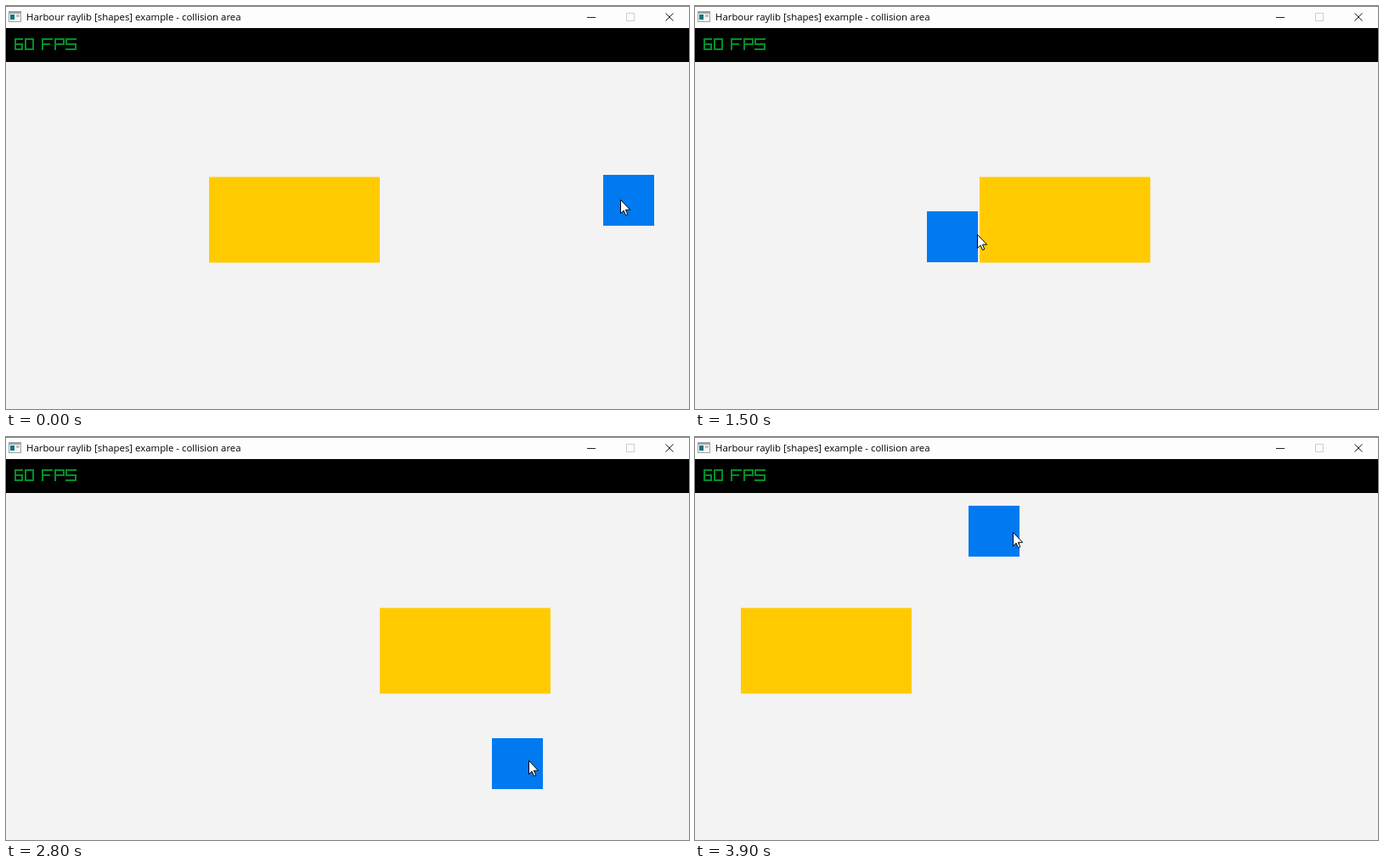
An HTML page for the animation above (4 s loop, 804 by 475 pixels).

```html
<!DOCTYPE html>
<html lang="en">
<head>
<meta charset="utf-8">
<title>Collision area</title>
<style>
  html, body { margin: 0; width: 100%; height: 100%; overflow: hidden; background: #f3f3f3; }
  svg { display: block; }
  .title { font: 11.4px "Open Sans", "Noto Sans", sans-serif; fill: #000; }
  .line { fill: none; stroke: #222; }
  .pale { fill: none; stroke: #cfcfcf; }
  .fps { fill: none; stroke: #00902b; stroke-width: 2; }
</style>
</head>
<body>
<svg width="804" height="475" viewBox="0 0 804 475">
  <!-- title bar -->
  <rect width="804" height="26" fill="#fdfdfd"/>
  <rect width="804" height="1" fill="#86817f"/>
  <g shape-rendering="crispEdges">
    <rect x="3" y="6" width="15" height="13" fill="#9aa3a8"/>
    <rect x="4" y="9" width="13" height="9" fill="#f4f6f7"/>
    <rect x="5" y="10" width="5" height="6" fill="#13747c"/>
    <rect x="12" y="10" width="4" height="3" fill="#b9c3c8"/>
    <path class="line" d="M684 13.5h10"/>
    <rect class="pale" x="730.5" y="8.5" width="9" height="9"/>
  </g>
  <path class="line" d="M776.5 8.5l9 9m0-9l-9 9"/>
  <text class="title" x="24" y="17">Harbour raylib [shapes] example - collision area</text>

  <!-- status bar -->
  <rect y="26" width="804" height="40"/>
  <path class="fps" d="M20 39H11V51H19V45H11M23 39H32V51H23ZM55 39H43V52M43 45H52M58 52V39H68V45H58M83 39H71V45H82V51H70"/>

  <rect id="gold" y="201.5" width="201" height="101" fill="#ffcb00"/>
  <rect id="blue" width="60" height="60" fill="#0079f1"/>
  <path id="pointer" d="M.5 .5V16.5L4.1 13.1 6.5 18.6 8.8 17.6 6.4 12.2H11.6Z" fill="#fff" stroke="#000"/>
</svg>
<script>
const LOOP = 4000, STEP = 100;
const HALF = 30;   // half the side of the blue box
const LAG = 1.5;   // speed per step for each pixel the pointer runs ahead
const [gold, blue, pointer] = ['gold', 'blue', 'pointer'].map(id => document.getElementById(id));

// Turning points of the blue box: step, x, y, pointer lead in x and y
const path = [
  [0, 703, 199, -10, -1],
  [5, 408, 130, -8, 3],
  [12, 195, 332, -20, -8],
  [15, 273, 242, 29, -3],
  [17, 308, 286, 10, 12],
  [20, 438, 353, 26, 5],
  [26, 575, 404, 0, 0],
  [28, 572, 355, 13, -4],
  [33, 559, 176, 5, -15],
  [39, 322, 81, 22, 1]
];

// Cubic Hermite value and slope at u, over a span of steps
function hermite(a, b, va, vb, u, span) {
  const d = b - a, p = va * span, q = vb * span;
  const c2 = 3 * d - 2 * p - q, c3 = p + q - 2 * d;
  return {
    value: a + u * (p + u * (c2 + u * c3)),
    slope: (p + u * (2 * c2 + 3 * u * c3)) / span
  };
}

function blueAt(n) {
  const i = Math.max(1, path.findIndex(key => key[0] >= n));
  const a = path[i - 1], b = path[i], span = b[0] - a[0];
  return [1, 2].map(k =>
    hermite(a[k], b[k], LAG * a[k + 2], LAG * b[k + 2], (n - a[0]) / span, span));
}

// The gold box bounces between -2 and 602, in whole units of 24 px;
// playback slows a little after step 15
function goldX(n) {
  const units = Math.floor(Math.min(8 * n / 5, 24 + 17 * (n - 15) / 12));
  const s = (968 + 24 * units) % 1208;
  return Math.floor(1.005 * (Math.min(s, 1208 - s) - 2));
}

function place(el, x, y) {
  el.setAttribute('transform', `translate(${Math.round(x)} ${Math.round(y)})`);
}

function draw(time) {
  const n = Math.floor(time % LOOP / STEP);
  const [x, y] = blueAt(n);
  place(gold, goldX(n), 0);
  place(blue, x.value, y.value);
  place(pointer, x.value + HALF + x.slope / LAG, y.value + HALF + y.slope / LAG);
}

const start = performance.now();
function tick() {
  draw(performance.now() - start);
  requestAnimationFrame(tick);
}
tick();
</script>
</body>
</html>
```
